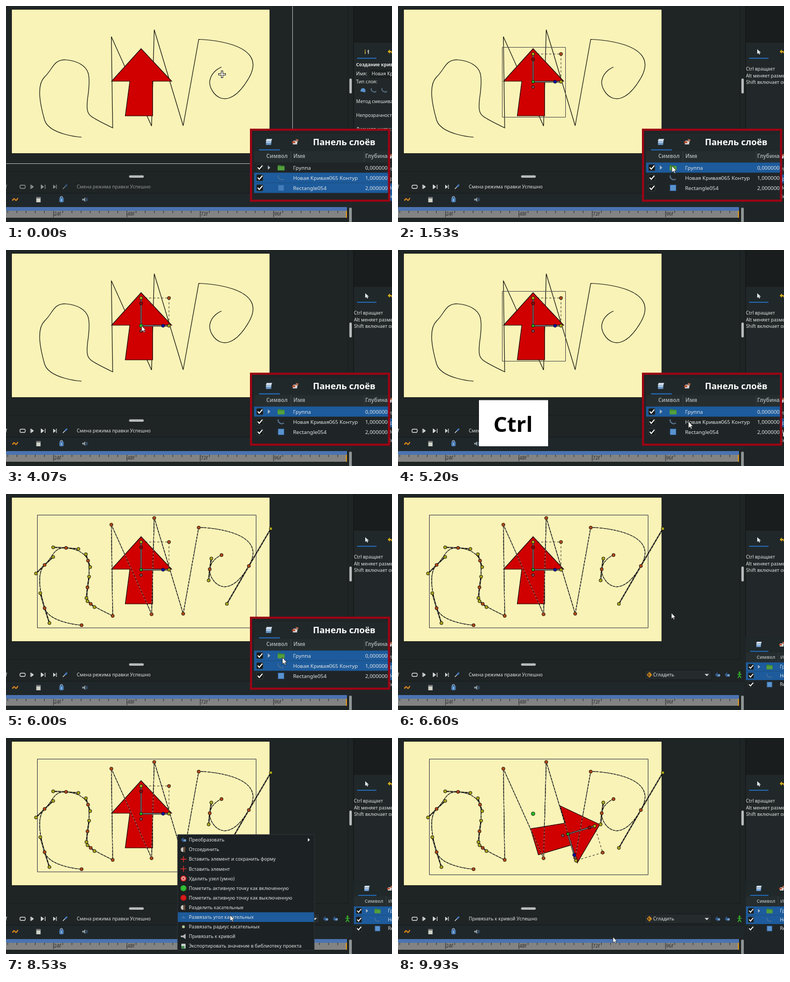
An HTML page for the animation above (9.99 s loop, 720 by 405 pixels).

```html
<!DOCTYPE html>
<html lang="ru">
<head>
<meta charset="utf-8">
<style>
  html, body { margin: 0; width: 100%; height: 100%; overflow: hidden; background: #1f2425; }
  svg { display: block; width: 720px; height: 405px; }
  text { font: 8.75px "Noto Sans", "Open Sans", sans-serif; fill: #e2e4e4; white-space: pre; }
  .b { font-weight: 700; }
  .cell { font-size: 8.58px; }
  .head { font-size: 8.5px; font-weight: 700; fill: #9ba1a2; }
</style>
</head>
<body>
<svg id="stage" viewBox="0 0 720 405" xmlns="http://www.w3.org/2000/svg"></svg>
<script>
const LOOP = 9990, FPS = 15;
const YELLOW = '#aaa51a', ORANGE = '#b34a16', BLUE = '#1d5b9c';

// ---- markup helpers ----
const rect = (x, y, w, h, fill, extra = '') =>
  `<rect x="${x}" y="${y}" width="${w}" height="${h}" fill="${fill}" ${extra}/>`;
const path = (d, stroke, width = 1, extra = '') =>
  `<path d="${d}" fill="none" stroke="${stroke}" stroke-width="${width}" ${extra}/>`;
const shape = (d, fill, extra = '') => `<path d="${d}" fill="${fill}" ${extra}/>`;
const text = (x, y, s, extra = '') => `<text x="${x}" y="${y}" ${extra}>${s}</text>`;
const dot = (x, y, fill, r = 3) =>
  `<circle cx="${x}" cy="${y}" r="${r}" fill="${fill}" stroke="#111" stroke-width=".9"/>`;
const group = (id, body, extra = '') => `<g id="${id}" ${extra}>${body}</g>`;
const at = (x, y, body) => `<g transform="translate(${x} ${y})">${body}</g>`;

// ---- drawing on the canvas ----
const CURVE = 'M141 246C141 246 81 242 72 214C64 186 56 149 72 133C88 118 88 100 112 101' +
  'C135 103 149 113 153 125C157 137 155 155 152 175C150 195 152 201 158 206' +
  'C165 212 199 228.500 199 228.500L196.500 57.500L271.500 225L276.500 44.500L330.500 224.500L359.500 62.500' +
  'C359.500 62.500 494 65 453 135C412 206 378 162 380 141C383 121 402 114.500 402 114.500';
const TANGENTS = [
  [64, 186, 72, 214, 81, 242], [56, 149, 72, 133, 88, 118], [88, 100, 112, 101, 135, 103],
  [149, 113, 153, 125, 157, 137], [155, 155, 152, 175, 150, 195], [152, 201, 158, 206, 165, 212],
  [494, 65, 453, 135, 412, 206], [383, 121, 380, 141, 378, 162]
];
const CORNERS = [[141, 246], [199, 228.5], [196.5, 57.5], [271.5, 225.5], [276.5, 45], [330.5, 224.5], [359.5, 63], [402, 114.5]];

const stripe = d => path(d, '#0c0c0c', 2.2) + path(d, '#a5a598', .9, 'stroke-dasharray="3 4"');
const curveHandles =
  path(CURVE, '#111', 1) + path(CURVE, '#b8b8a8', .9, 'stroke-dasharray="3 3.5"') +
  TANGENTS.map(([a, b, c, d, e, f]) => stripe(`M${a} ${b}L${c} ${d}L${e} ${f}`)).join('') +
  TANGENTS.map(([a, b, c, d, e, f]) => dot(a, b, YELLOW) + dot(c, d, ORANGE) + dot(e, f, YELLOW)).join('') +
  CORNERS.map(([x, y]) => dot(x, y, ORANGE)).join('');

const AXES = 'M252 142V90M252 142H304';
const arrow = shape('M252 80L309 141H273.5V206H222.5L231 141H197Z', '#d00000',
  'stroke="#1a0505" stroke-width="1.2"');
const arrowHandles =
  path('M252 90H304V142', '#222', .9, 'stroke-dasharray="4 3.5"') +
  path(AXES, '#111', 2.8) + path(AXES, '#8c8c8c', 1.3) +
  dot(252, 152, '#8a5050', 2.6) + dot(252, 100, '#900808') + dot(252, 90, YELLOW) +
  dot(293, 142, '#0c10b0') + dot(304, 142, YELLOW) + dot(304, 90, ORANGE);

const ticks = Array.from({ length: 38 }, (_, i) => {
  const x = 3.2 + i * 17.1, major = i % 8 === 5;
  return path(`M${x.toFixed(1)} ${384}v${major ? 12 : 4}`, '#2a2a2a', 1);
}).join('');

// ---- icons, each around its own origin ----
const sheets = shape('M-3.500-5H5.500L4-1.500H-5Z', '#d5e2f0') + shape('M-4-1.500H4.800L3.500 2H-5Z', '#a9c6e4') +
  shape('M-4 2H4.500L3.500 5H-5Z', '#6b9bd0');
const sheetSet = shape('M-3-2H4L3 4H-4Z', '#d5d5d5') + shape('M-5-1H0V2H-5Z', '#c04a30') + shape('M1-4.500H5V-1H1Z', '#b06a50');
const folder = shape('M-5.500-4H-1L0-3H5.500V4.500H-5.500Z', '#3f8a2c') + shape('M-5.500-1.500H5.500V4.500H-5.500Z', '#559f3e');
const spline = path('M-4.500-4C-6 2 1 5 4.500 2', '#5d7896', 1.7);
const pointer = shape('M-3-5V4L-1 2L1 5L2.5 4L1 1.5H4Z', '#dfe6ea');
const pin = path('M-3-5V4', '#d9b84a', 1.5) + path('M3-4V4M1-1H4', '#c9ccc8', 1.4) + dot(-3, -3, '#e0c860', 1.5);
const undo = shape('M-4 0L0-4V-1.500Q5-1.500 4 4Q3 1 0 1V4Z', '#d9ae1c');
const plus = path('M-5.500 0H5.500M0-5.500V5.500', '#e03030', 1.4);
const ball = c => `<circle r="5.600" fill="${c}"/>` + path('M-3-2H3M-3 1H3', '#fff', .6, 'opacity=".3"');
const split = shape('M0-4.500Q-5-4.500-5 0T0 4.500Z', '#c9c3b8') + path('M2-5V5', '#9a6a4a', 1.6);
const gem = shape('M-4 2.500L0-2.500L4 2.500Z', '#3f72a8');
const bird = shape('M-4.500 0L0-5V5Z', '#2f5d92') + `<circle cx="2.5" cy="1" r="2.500" fill="#6f98c4"/>`;
const page = rect(-4, -4.500, 8, 9, '#c8d0cc', 'rx="1"') + shape('M-4 0H2V4.500H-4Z', '#3f8a4c');

// ---- layers panel ----
const rowY = i => 324 + i * 16.6;
const check = y => rect(653, y - 5, 10.5, 10.5, '#15191a', 'rx="1.5" stroke="#3d4547" stroke-width=".7"') +
  path(`M655 ${y}l2.5 3l5-6`, '#fff', 1.7);
const layerNames = ['Группа', 'Новая Кривая065 Контур', 'Rectangle054'];
const layerIcons = [folder, spline, rect(-4.8, -4.8, 9.6, 9.6, '#5b93cf', 'stroke="#2d5f98" stroke-width=".8"')];
const layersPanel =
  rect(645, 268, 230, 140, '#1f2527') + rect(649, 269, 226, 28, '#20282a') +
  rect(657, 294, 34, 2, '#2465ad') + at(673, 282, sheets) + at(716, 282, sheetSet) +
  rect(649, 297, 226, 18.6, '#262d2f') + path('M709 297v18M828.500 297v18', '#3a4245', .8) +
  text(669, 308.5, 'Символ', 'class="head"') + text(713, 308.5, 'Имя', 'class="head"') +
  text(830, 308.5, 'Глубина', 'class="head"') +
  layerNames.map((name, i) => {
    const y = rowY(i);
    return rect(649, y - 8.3, 226, 16.6, BLUE, `id="row${i}"`) + check(y - .3) +
      group('layerIcon' + i, at(693, y, layerIcons[i])) +
      text(712.5, y + 3.1, name, 'class="cell"') + text(830, y + 3.1, i + ',000000', 'class="cell"');
  }).join('') +
  shape('M671.500 320.500l4 3.500l-4 3.500z', '#a9b8c4');

// ---- context menu ----
const MENU_TOP = 182, MENU_ROW = 18.1;
const menuItems = [
  ['Преобразовать', bird], ['Отсоединить', split], ['Вставить элемент и сохранить форму', plus],
  ['Вставить элемент', plus],
  ['Удалить узел (умно)', ball('#d01818') + '<circle r="3.6" fill="#f0e4e0"/>' + path('M-2-2L2 2M2-2L-2 2', '#c01818', 1.5)],
  ['Пометить активную точку как включенную', ball('#2bb52b')],
  ['Пометить активную точку как выключенную', ball('#d01212')],
  ['Разделить касательные', split], ['Развязать угол касательных', gem],
  ['Развязать радиус касательных', `<circle r="2.6" fill="#b9c99a"/>`],
  ['Привязать к кривой', shape('M-5-1.500H-1L4-5V5L-1 1.500H-5Z', '#b5b5b5')],
  ['Экспортировать значение в библиотеку проекта', page]
];
const menu =
  rect(320, 181, 255, 217, '#1c2123', 'stroke="#343b3e" stroke-width=".8"') +
  rect(320.5, 0, 254, MENU_ROW, BLUE, 'id="menuHover"') +
  menuItems.map(([label, icon], i) => {
    const y = MENU_TOP + MENU_ROW * (i + .5);
    return at(331, y, icon) + text(341, y + 3.2, label);
  }).join('') + shape('M563 187.500l4 3.500l-4 3.500z', '#ddd');

// ---- tool options ----
const splineOptions =
  at(673, 86, pin) + text(653, 113, 'Создание кривой', 'class="b"') + text(653, 130, 'Имя:') +
  rect(678, 119, 50, 16, '#1b2021') + text(682, 130, 'Новая Кривая066') + text(653, 145, 'Тип слоя:') +
  at(666, 158, shape('M-5 2Q-4-5 1-4Q6-2 4 4Z', '#5b93cf')) + at(686, 158, spline) + at(706, 158, spline) +
  text(653, 182, 'Метод смешивания:') + text(653, 208, 'Непрозрачность:') + text(653, 234, 'Диаметр кисти:');
const transformOptions = at(673, 86, pointer) +
  text(649, 121, 'Ctrl вращает') + text(649, 133.5, 'Alt меняет размер') + text(649, 146, 'Shift включает оптимизацию');

// ---- window ----
const playIcons =
  text(-1, 342, 'f') +
  path('M28 336h6q2 0 2 3t-2 3h-6q-2 0-2-3t2-3', '#d5d8d8', 1.3) +
  [47, 66, 88].map(x => shape(`M${x} 335l5 4l-5 4z`, '#d5d8d8')).join('') +
  path('M46 335v8M65.500 335v8M73 335v8M94 335v8', '#d5d8d8', 1.2) +
  path('M106 343l5-5', '#c9d2d8', 1.5) + path('M110 339l4-4', '#3f78b8', 3) +
  text(132, 342.2, '', 'id="status"');
const dropdown =
  rect(460, 330, 125, 18, '#252b2d', 'stroke="#15191a" rx="2"') +
  shape('M469 333.500l5 5.500l-5 5.500l-5-5.500z', '#c8861c') + shape('M469 336v6l-3-3z', '#5a3a10') +
  text(476, 342.2, 'Сгладить') + shape('M572 337.500h8l-4 4z', '#ddd') +
  at(596, 339, bird) + at(614, 339, bird) +
  path('M637 336v4l-3 5M637 340l3 5M633 338h8', '#35b52a', 1.6) + `<circle cx="637" cy="334.500" r="1.7" fill="#35b52a"/>`;
const timeline =
  rect(0, 351, 648, 26, '#20272a') + path('M0 351H648', '#15191a') +
  path('M12 365q3-6 5-2t5-3', '#e08a1e', 2) +
  rect(56.5, 359, 8, 9, '#cfd3c8') + rect(56.5, 358, 8, 3, '#777') +
  rect(99.5, 359, 8, 9, '#4e82bd', 'rx="2"') + path('M101 359q2-4 5 0M103.500 362v4', '#c9d9ec', 1.1) +
  shape('M142 361.500h3l3-3v9l-3-3h-3z', '#8d9aa0') + path('M150 360q2 3 0 6', '#4e82bd', 1.2) +
  rect(0, 377, 636, 7.5, '#4c73b0') + rect(0, 384, 636, 13, '#838383') + ticks +
  [24, 48, 72, 96].map((n, i) => text(89.500 + i * 136.9, 393, n + 'f', 'style="fill:#2a2a2a"')).join('') +
  rect(634, 384, 2, 13, '#e0981c') + rect(640, 378, 5, 30, '#8f9495', 'rx="2"');

const windowFrame =
  rect(0, 0, 720, 405, '#1f2425') +
  rect(10.5, 6.3, 481.5, 270.2, '#faf3b7', 'stroke="#111" stroke-width=".8"') +
  group('wideBox', path('M534.500 0V295.500H0', '#c4c8c8', .9)) +
  path(CURVE, '#161610', 1.2) +
  group('arrow', arrow) +
  group('curveHandles', path('', '#33334a', 1, 'id="curveBox"') + curveHandles) +
  group('groupBox', path('M194.500 77.500H312.500V208.500H194.500Z', '#4a4a4a', 1)) +
  group('arrowHandles', arrowHandles) +
  group('origin', rect(249.5, 139.500, 5, 5, '#24b524', 'stroke="#111" rx="1"')) +
  group('originHot', dot(252, 142, '#28c028', 3.4)) +
  rect(0, 310, 648, 95, '#1f2425') + rect(637, 0, 11.5, 405, '#1f2425') + path('M0 310.500H638V0', '#181c1d', 1) +
  rect(640.5, 136, 4.500, 28, '#b9bcbc', 'rx="2"') + rect(229.500, 317.500, 27.5, 4.500, '#b9bcbc', 'rx="2"') +
  group('play', playIcons) + dropdown + timeline +
  rect(648.5, 0, 72, 405, '#222829') + rect(648.5, 0, 72, 69, '#191d1e') + path('M648.500 0V405', '#141718', 1.3) +
  rect(649, 73, 72, 27, '#20282a') + rect(655, 97, 36, 2, '#2465ad') + at(716, 85.500, undo) +
  group('splineOptions', splineOptions) + group('transformOptions', transformOptions);

const cursor = group('cursor',
  group('cross', path('M-7 0H7M0-7V7', '#222', 4) + path('M-6 0H6M0-6V6', '#f4f4ee', 2)) +
  group('pointer', shape('M0 0V11L2.600 8.800L4.300 12.500L6 11.700L4.400 8.200H7.600Z', '#fff', 'stroke="#222" stroke-width=".8"')));

const zoomPanel =
  rect(457, 232, 258, 133, '#1f2527') +
  `<g clip-path="url(#zoomClip)"><g transform="translate(-280.4 -68) scale(1.145)"><use href="#layers"/><use href="#cursor"/></g></g>` +
  rect(457, 232, 257.5, 133, 'none', 'stroke="#9a0414" stroke-width="4"') +
  text(572.5, 260.5, 'Панель слоёв', 'class="b" style="font-size:16.4px;fill:#fff"');
const keycap = rect(151, 281.5, 129, 86.5, '#fff') +
  text(178, 340.5, 'Ctrl', 'class="b" style="font-size:40px;fill:#000"');

document.getElementById('stage').innerHTML =
  `<defs><clipPath id="zoomClip">${rect(459, 234, 254, 129, '#000')}</clipPath></defs>` +
  windowFrame + group('layers', layersPanel) + group('menu', menu) + cursor +
  group('zoom', zoomPanel) + group('keycap', keycap);

// ---- motion ----
const el = id => document.getElementById(id);
const show = (id, on) => el(id).setAttribute('display', on ? 'inline' : 'none');
const move = (id, value) => el(id).setAttribute('transform', value);
const fade = (id, value) => el(id).setAttribute('opacity', value);

const SELECT_GROUP = 1270, SELECT_CURVE = 5800, MENU_OPEN = 7870, LINKED = 9130;
const cursorKeys = [
  [0, 403, 128], [1130, 691, 321], [2730, 691, 321], [3700, 253, 142], [4200, 253, 142],
  [5060, 718, 340], [5870, 718, 340], [6500, 510, 223], [6730, 510, 223], [7200, 252, 142],
  [7400, 252, 142], [7730, 319, 180], [7930, 319, 180], [8400, 418, 332], [8600, 418, 332],
  [8950, 401, 373], [LOOP, 401, 373]
];

function cursorAt(t) {
  const i = cursorKeys.findIndex(k => k[0] > t);
  const [t0, x0, y0] = cursorKeys[i - 1], [t1, x1, y1] = cursorKeys[i];
  const p = (t - t0) / (t1 - t0), e = p * p * (3 - 2 * p);
  return [x0 + (x1 - x0) * e, y0 + (y1 - y0) * e];
}

function render(ms) {
  const t = Math.floor(ms * FPS / 1000 + .1) * 1000 / FPS;
  const [x, y] = cursorAt(Math.min(t, LOOP - 1));
  const drawing = t < SELECT_GROUP, curveOn = t >= SELECT_CURVE, linked = t >= LINKED;
  const hot = Math.hypot(x - 252, y - 142) < 5;

  move('cursor', `translate(${x} ${y})`);
  show('cross', drawing && x < 640);
  show('pointer', !drawing || x >= 640);

  show('wideBox', drawing);
  show('splineOptions', drawing);
  show('transformOptions', !drawing);
  fade('play', drawing ? .6 : 1);
  el('status').textContent = (linked ? 'Привязать к кривой' : 'Смена режима правки') + ' Успешно';

  const pose = linked ? 'translate(65 38) rotate(73.3 252 142)' : '';
  move('arrow', pose);
  move('arrowHandles', pose);
  move('origin', pose);
  show('arrowHandles', !drawing);
  show('origin', !drawing && !hot);
  show('originHot', hot && !drawing || linked);
  show('groupBox', !drawing && !curveOn && !hot);
  show('curveHandles', curveOn);
  show('curveBox', !hot);
  el('curveBox').setAttribute('d', `M58.500 39.500H466.500V${linked ? 256.5 : 251}H58.500Z`);

  const selected = [!drawing, drawing || curveOn, drawing];
  selected.forEach((on, i) => {
    show('row' + i, on);
    fade('layerIcon' + i, on && i ? .6 : 1);
  });

  const item = Math.floor((y - MENU_TOP) / MENU_ROW);
  show('menu', t >= MENU_OPEN && !linked);
  show('menuHover', item >= 0 && x > 320);
  el('menuHover').setAttribute('y', MENU_TOP + item * MENU_ROW);
  show('zoom', t < 6200);
  show('keycap', t >= 4730 && t < 6000);
}

const start = performance.now();
function tick() {
  render((performance.now() - start) % LOOP);
  requestAnimationFrame(tick);
}
render(0);
requestAnimationFrame(tick);
</script>
</body>
</html>
```
